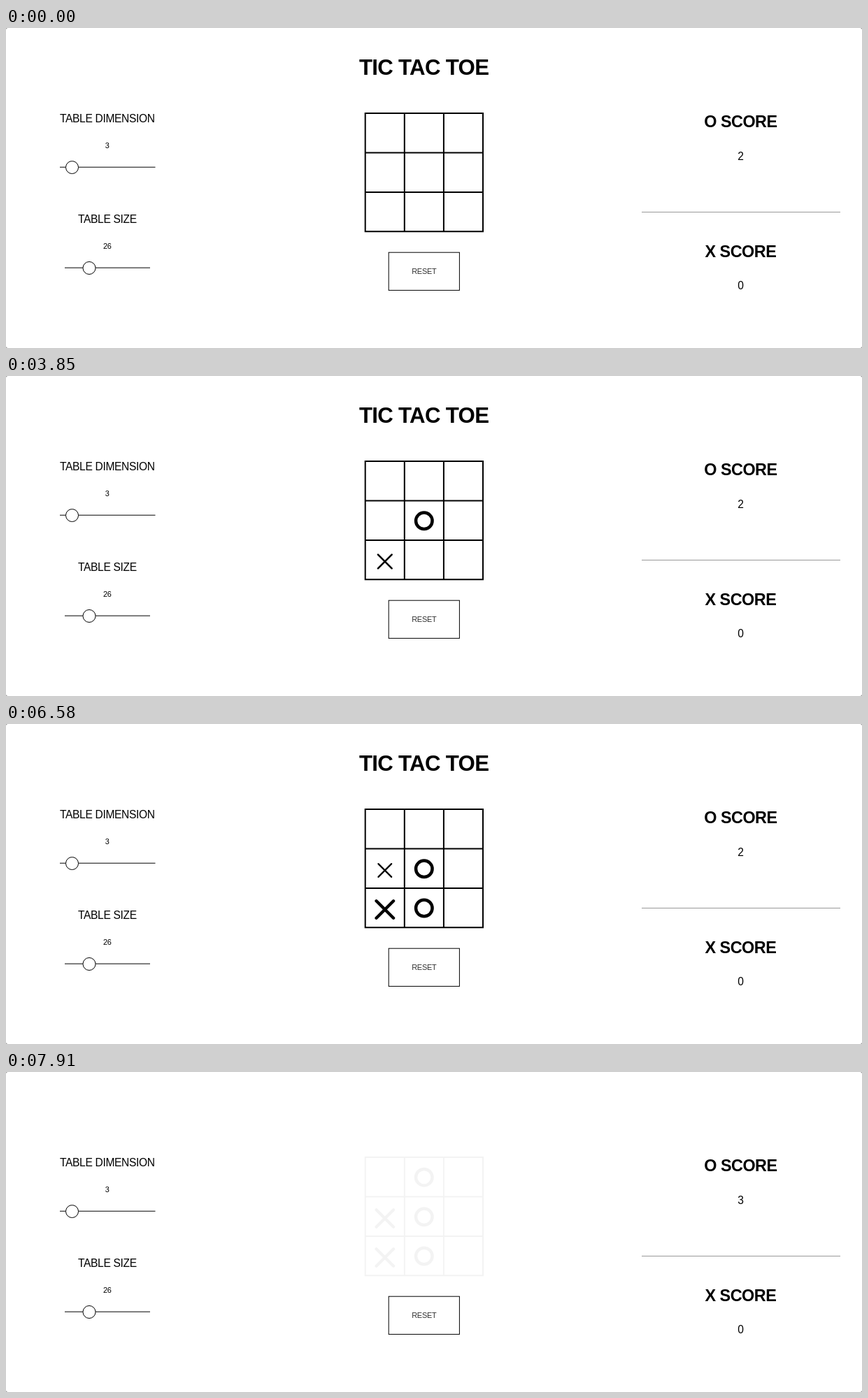
An HTML page that plays this animation: 1224 by 458 pixels, repeating every 8000 ms.

```html
<!DOCTYPE html>
<html lang="en">
<head>
<meta charset="utf-8">
<title>Tic Tac Toe</title>
<style>
  html, body { margin: 0; width: 100%; height: 100%; overflow: hidden; background: #8a8a8a; }
  svg { display: block; width: 100vw; height: 100vh; }
  text { font: 15.6px "Liberation Sans", Arial, sans-serif; letter-spacing: -.022em; text-anchor: middle; fill: #000; }
  .title { font-size: 31.2px; font-weight: bold; }
  .score { font-size: 23.4px; font-weight: bold; }
  .small { font-size: 10.9px; }
  .line { fill: #fff; stroke: #000; stroke-width: 1; }
  #board { fill: none; stroke: #000; }
</style>
</head>
<body>
<svg viewBox="0 0 1224 458">
  <rect width="1224" height="458" rx="3" fill="#fff"/>
  <text id="title" class="title" x="597.6" y="67.3">TIC TAC TOE</text>

  <text x="144.9" y="134.5">TABLE DIMENSION</text>
  <text class="small" x="144.7" y="172.2">3</text>
  <path class="line" d="M77 199.2H213.5"/>
  <circle class="line" cx="94.5" cy="199.5" r="9"/>

  <text x="144.9" y="278.5">TABLE SIZE</text>
  <text class="small" x="144.7" y="316.2">26</text>
  <path class="line" d="M84 343.2H206"/>
  <circle class="line" cx="119" cy="343.5" r="9"/>

  <g id="board">
    <path id="grid" stroke-width="2"/>
  </g>
  <rect class="line" x="547.2" y="321.2" width="101.2" height="54.2"/>
  <text class="small" x="597.8" y="352" style="fill:#333">RESET</text>

  <text class="score" x="1050.4" y="142">O SCORE</text>
  <text id="oScore" x="1050.4" y="188.5">2</text>
  <path d="M909 263.5H1193" stroke="#999"/>
  <text class="score" x="1050.4" y="327.5">X SCORE</text>
  <text x="1050.4" y="374">0</text>
</svg>
<script>
const LOOP = 8000, WIN = 6860, CELL = 56, MARK = 28;
const LEFT = 513.7, TOP = 122.1, PITCH_X = 56.1, PITCH_Y = 56.4;
const board = document.getElementById('board');
const title = document.getElementById('title');
const oScore = document.getElementById('oScore');

const progress = (t, start, length) => Math.min(1, Math.max(0, (t - start) / length));
const mix = (a, b, p) => a + (b - a) * p;

function add(tag) {
  return board.appendChild(document.createElementNS('http://www.w3.org/2000/svg', tag));
}
function set(node, attrs) {
  for (const name in attrs) node.setAttribute(name, attrs[name]);
}

const lines = [0, 1, 2, 3].map(i =>
  `M${LEFT - 1} ${TOP + i * PITCH_Y}h${3 * PITCH_X + 2}M${LEFT + i * PITCH_X} ${TOP - 1}v${3 * PITCH_Y + 2}`);
document.getElementById('grid').setAttribute('d', lines.join(''));

// Square outline with the stroke kept inside the given outer size.
function drawRing(node, x, y, size, width, radius) {
  const side = Math.max(0, size - width);
  set(node, {
    x: x - side / 2, y: y - side / 2, width: side, height: side,
    rx: Math.min(side / 2, Math.max(0, radius - width / 2)), 'stroke-width': width
  });
}

// The cell outline shrinks and rounds into a circle.
function makeO(start, x, y) {
  const ring = add('rect');
  return t => {
    const p = progress(t, start, 640);
    ring.style.display = t < start ? 'none' : '';
    drawRing(ring, x, y, mix(CELL, MARK, p), mix(5.2, 4.5, p), 28 * p ** 1.8);
  };
}

// The cell outline collapses, then a cross opens from the centre.
function makeX(start, x, y) {
  const ring = add('rect'), cross = add('path');
  cross.setAttribute('stroke-linecap', 'round');
  return t => {
    const shrink = progress(t, start, 400), grow = progress(t, start + 400, 600);
    ring.style.display = t < start || shrink === 1 ? 'none' : '';
    cross.style.display = grow > 0 ? '' : 'none';
    drawRing(ring, x, y, mix(CELL, 0, shrink), mix(5.2, 1, shrink), 0);
    const width = 4.4 * grow, half = MARK / 2 * grow ** 0.45 - width * 0.4;
    set(cross, {
      d: `M${x - half} ${y - half}L${x + half} ${y + half}M${x + half} ${y - half}L${x - half} ${y + half}`,
      'stroke-width': width
    });
  };
}

const marks = [
  makeO(2380, 597.8, 207.3),
  makeX(3110, 541.8, 265.5),
  makeO(4620, 597.8, 263.5),
  makeX(5880, 541.8, 209.5),
  makeO(WIN, 597.8, 150.7)
];

function draw(now) {
  const t = now % LOOP;
  marks.forEach(mark => mark(t));
  board.style.opacity = 1 - progress(t, WIN, 1100);
  const out = progress(t, WIN, 200);
  title.style.opacity = 1 - out;
  title.style.filter = out > 0 ? `blur(${15 * out}px)` : 'none';
  oScore.textContent = t < WIN ? 2 : 3;
}

const begin = performance.now();
function tick() {
  draw(performance.now() - begin);
  requestAnimationFrame(tick);
}
tick();
</script>
</body>
</html>
```
